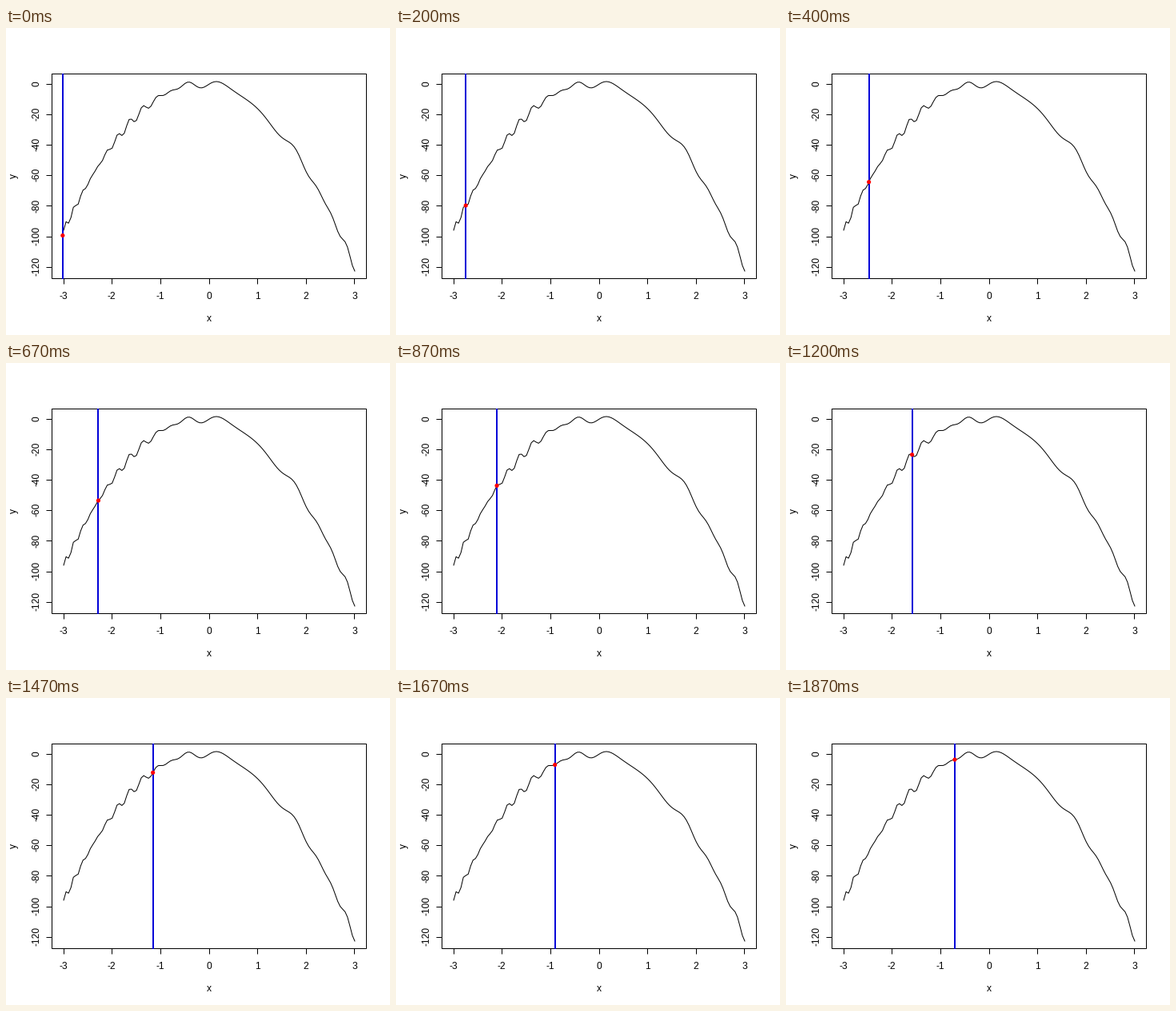
Recreate the animation shown at these times as a matplotlib script. Size 480 by 384 pixels, loop 1990 ms.

```python
import numpy as np
import matplotlib.pyplot as plt
from matplotlib.animation import FuncAnimation
from matplotlib.patches import Circle

W, H, DPI = 480, 384, 80
PX = 72 / DPI  # points per pixel
LEFT, RIGHT, TOP, BOTTOM = 57, 450, 57, 313
HALF = 0.5  # from a pixel's edge to its centre
TICK = 7
LOOP_MS, INTERVAL, RATE = 1990, 10, 15

# The climb: place on the x axis at a few ticks, and ticks without a step
CLIMB = {0: -3.02, 6: -2.48, 10: -2.285, 13: -2.11, 16: -1.71,
         18: -1.59, 20: -1.46, 22: -1.16, 26: -0.83, 28: -0.71}
RESTS = {7, 11, 17, 19, 21, 23, 27, 29}

plt.rcParams["font.family"] = "Liberation Sans"


def f(x):
    return 3 * np.cos(2 * x) * np.sin(8 * x - 5 * x**2) - 12 * x**2 - 4 * x


def scale(values, start, end):
    """Map data to pixels, with a margin of 4 % at both ends."""
    low, high = np.min(values), np.max(values)
    pad = 0.04 * (high - low)
    rate = (end - start) / (high - low + 2 * pad)
    return lambda v: start + (v - low + pad) * rate


xs = np.linspace(-3, 3, 121)
px = scale(xs, LEFT, RIGHT)
py = scale(f(xs), BOTTOM, TOP)

fig = plt.figure(figsize=(W / DPI, H / DPI), dpi=DPI, facecolor="white")
ax = fig.add_axes([0, 0, 1, 1])
ax.set_xlim(0, W)
ax.set_ylim(H, 0)
ax.axis("off")


def line(x, y, color="black", width=1, **kw):
    return ax.plot(x, y, color=color, lw=width * PX, **kw)[0]


def label(x, y, text, angle=0):
    ax.text(x, y, text, size=12 * PX, rotation=angle, ha="center",
            va="baseline", rotation_mode="anchor")


line([LEFT, RIGHT, RIGHT, LEFT, LEFT], [TOP, TOP, BOTTOM, BOTTOM, TOP],
     solid_joinstyle="miter")
for v in range(-3, 4):
    line([px(v)] * 2, [BOTTOM, BOTTOM + TICK], solid_capstyle="butt")
    label(px(v), 339, str(v))
for v in range(-120, 1, 20):
    line([LEFT - TICK, LEFT], [py(v)] * 2, solid_capstyle="butt")
    label(41, py(v) - HALF, str(v), 90)
label(px(0), 367, "x")
label(13, (TOP + BOTTOM) / 2 - HALF, "y", 90)

line(px(xs) + HALF, py(f(xs)) + HALF)
bar = line([0, 0], [TOP, BOTTOM + 1], "#0000d8", 2,
           solid_capstyle="butt", zorder=3)
dot = Circle((0, 0), 2.6, color="red", lw=0, zorder=4)
ax.add_patch(dot)


def update(frame):
    tick = int((frame * INTERVAL + 4) * RATE / 1000)
    if tick in RESTS:
        tick -= 1
    x = np.interp(tick, list(CLIMB), list(CLIMB.values()))
    bar.set_xdata([px(x) + HALF] * 2)
    dot.center = px(x) + HALF, py(f(x)) + HALF
    return bar, dot


anim = FuncAnimation(fig, update, frames=LOOP_MS // INTERVAL,
                     interval=INTERVAL, repeat=True, repeat_delay=0)
plt.show()
```
